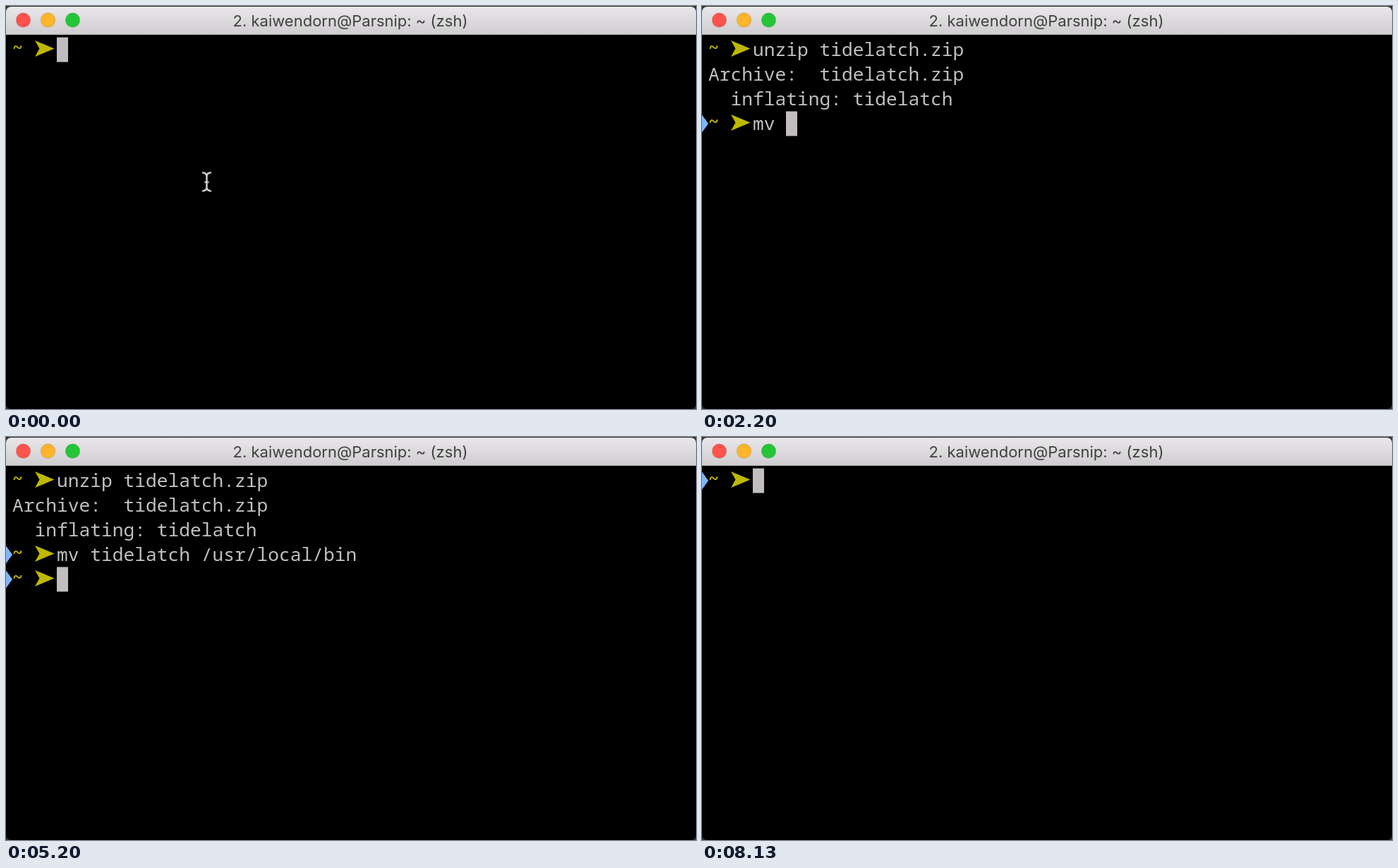
These frames come from a looping animation (978x572 px, 8190 ms). An HTML page:

```html
<!DOCTYPE html>
<html lang="en">
<head>
<meta charset="utf-8">
<title>Terminal</title>
<style>
  html, body { margin: 0; width: 100%; height: 100%; overflow: hidden; background: #34372f; }
  svg { display: block; width: 978px; height: 572px; }
  text { white-space: pre; }
  .title { font: 400 22px Inter, "Open Sans", sans-serif; fill: #414041; text-anchor: middle; }
  .mono { font: 400 26.25px "Noto Sans Mono", "DejaVu Sans Mono", monospace; font-variant-ligatures: none; fill: #c0c0c0; }
  .mono.dir { font-weight: 600; font-size: 25px; fill: #bfb800; }
</style>
</head>
<body>
<svg viewBox="0 0 978 572">
  <defs>
    <linearGradient id="bar" x2="0" y2="1">
      <stop offset="0" stop-color="#e9e7e9"/>
      <stop offset="1" stop-color="#cfcdcf"/>
    </linearGradient>
    <clipPath id="frame"><rect y="1" width="978" height="571" rx="7"/></clipPath>
    <path id="ibeam" d="M279 236.5Q284.5 237 284.5 242Q284.5 237 290 236.5M284.5 242V257M279 262.5Q284.5 262 284.5 257Q284.5 262 290 262.5M282.5 250H286.5"/>
  </defs>
  <g clip-path="url(#frame)">
    <rect width="978" height="572"/>
    <rect y="1" width="978" height="39" fill="url(#bar)"/>
    <rect y="40" width="978" height="1" fill="#a3a1a3"/>
  </g>
  <g id="lights"></g>
  <text class="title" x="488" y="28.5">2. kaiwendorn@Parsnip: ~ (zsh)</text>
  <g id="rows"></g>
  <rect id="cursor" width="16" height="35" fill="#c1bdc1"/>
  <g id="beam" fill="none" stroke-linecap="round">
    <use href="#ibeam" stroke="#777" stroke-width="3"/>
    <use href="#ibeam" stroke="#dcdcdc" stroke-width="1.5"/>
  </g>
</svg>
<script>
  const LOOP = 8190, CLEAR = 6930, RETURN = 7800;
  const LEFT = 9, TOP = 44.5, CELL = 15.75, LINE = 35;

  // A burst is [text, first key, last key]; without a last key it appears at once.
  const lines = [
    { row: 0, from: 0, to: CLEAR,
      bursts: [["unzip ", 130, 600], ["tid", 800, 1000], ["elatch.zip ", 1200]] },
    { row: 1, from: 1400, to: CLEAR, output: "Archive:  tidelatch.zip" },
    { row: 2, from: 1400, to: CLEAR, output: "  inflating: tidelatch" },
    { row: 3, from: 1530, to: CLEAR, mark: true,
      bursts: [["mv ", 2000, 2200], ["tid", 2530, 2730], ["elatch ", 3000], ["/", 3130],
               ["usr/", 3400, 3730], ["local/bin", 4330, 5000]] },
    { row: 4, from: 5200, to: CLEAR, mark: true,
      bursts: [["ti", 5930], ["delatch", 6130, 6600]] },
    { row: 0, from: RETURN, to: LOOP, mark: true, bursts: [] }
  ];

  const byId = id => document.getElementById(id);
  const rows = byId("rows"), cursor = byId("cursor"), beam = byId("beam");

  function add(parent, tag, attrs, content = "") {
    const el = document.createElementNS("http://www.w3.org/2000/svg", tag);
    for (const name in attrs) el.setAttribute(name, attrs[name]);
    el.textContent = content;
    return parent.appendChild(el);
  }

  function show(el, on) {
    el.style.display = on ? "" : "none";
  }

  function build(line) {
    const group = add(rows, "g", { transform: `translate(0 ${TOP + line.row * LINE})` });
    line.group = group;
    line.x = LEFT;
    if (line.mark) add(group, "path", { d: "M0 5L9 17.5L0 30Z", fill: "#7db6ff" });
    if (line.bursts) {
      line.x += 4 * CELL;
      add(group, "text", { class: "mono dir", x: LEFT, y: 23.5 }, "~");
      add(group, "path", { d: "M41 4.5L68.5 16L41 27.5L47.5 16Z", fill: "#bfb800" });
    }
    line.label = add(group, "text", { class: "mono", x: line.x, y: 26.5 }, line.output);
  }

  function typed([text, first, last = first], t) {
    if (t < first) return "";
    if (t >= last) return text;
    const progress = (t - first) / (last - first);
    return text.slice(0, 1 + Math.floor(progress * (text.length - 1)));
  }

  function placeCursor(x, row) {
    cursor.setAttribute("x", Math.floor(x));
    cursor.setAttribute("y", TOP + row * LINE);
  }

  function draw(t) {
    for (const line of lines) {
      const on = t >= line.from && t < line.to;
      show(line.group, on);
      if (!on) continue;
      if (line.bursts) {
        const text = line.bursts.map(burst => typed(burst, t)).join("");
        line.label.textContent = text;
        placeCursor(line.x + text.length * CELL, line.row);
      } else {
        placeCursor(LEFT, line.row + 1);
      }
    }
    show(cursor, t < CLEAR || t >= RETURN);
    show(beam, t < 130);
  }

  ["#ff544d", "#ffb429", "#24c638"].forEach((fill, i) =>
    add(byId("lights"), "circle", { cx: 24.5 + 35 * i, cy: 20, r: 10.2, fill, stroke: "#0002" }));
  lines.forEach(build);

  const start = performance.now();
  function tick() {
    draw((performance.now() - start) % LOOP);
    requestAnimationFrame(tick);
  }
  tick();
</script>
</body>
</html>
```
